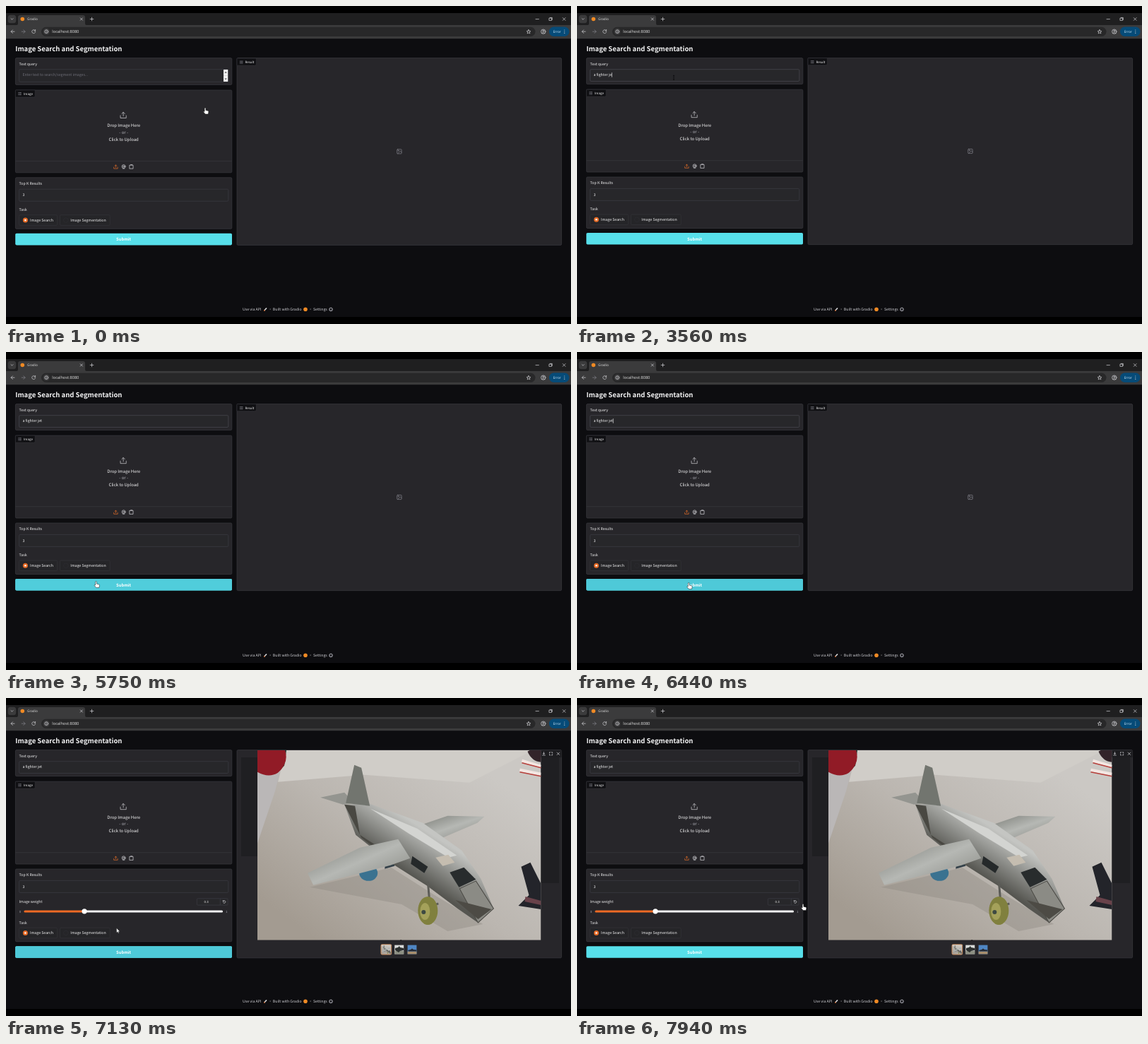
An HTML page for the animation above (8000 ms loop, 800 px wide and 450 px high).

```html
<!DOCTYPE html>
<html lang="en">
<head>
<meta charset="utf-8">
<title>Image Search and Segmentation</title>
<style>
html, body { margin: 0; width: 100%; height: 100%; overflow: hidden; background: #000; }
body > svg { display: block; width: 100vw; height: 100vh; }
text { font: 5.22px "Noto Sans CJK SC", "Noto Sans CJK JP", "Noto Sans", sans-serif; fill: #f4f4f5; text-rendering: geometricPrecision; }
.big { font-size: 5.97px; text-anchor: middle; }
.small { font-size: 4.47px; }
.mid { text-anchor: middle; }
.foot text { fill: #d0d0d5; }
.chrome text { font-family: "Open Sans", "Noto Sans", sans-serif; fill: #e3e3e3; }
.mono { font: bold 5px "Liberation Mono", monospace; text-anchor: end; }
.block { fill: #27262a; stroke: #3b3b41; stroke-width: .7; }
.field { fill: #27272a; stroke: #414148; stroke-width: .6; }
.badge { fill: #101013; stroke: #3b3b41; stroke-width: .5; }
.icon { fill: none; stroke: #d4d4d8; stroke-width: .7; stroke-linecap: round; stroke-linejoin: round; }
.dim { stroke: #85858d; }
.orange { stroke: #e8702a; }
.bar { fill: #19191b; }
.logo { fill: #f08a24; }
</style>
</head>
<body>
<svg viewBox="0 0 800 450">
  <defs>
    <linearGradient id="floor" gradientUnits="userSpaceOnUse" x1="640" y1="74" x2="440" y2="343">
      <stop stop-color="#cbc8c4"/><stop offset=".5" stop-color="#bbb6b0"/><stop offset="1" stop-color="#a39b91"/>
    </linearGradient>
    <linearGradient id="metal" gradientUnits="userSpaceOnUse" x1="590" y1="185" x2="555" y2="240">
      <stop stop-color="#c4c5c2"/><stop offset=".45" stop-color="#92938f"/><stop offset="1" stop-color="#555550"/>
    </linearGradient>
    <linearGradient id="wing" x2="1" y2="1">
      <stop stop-color="#777973"/><stop offset=".5" stop-color="#b6b8b4"/><stop offset="1" stop-color="#83847e"/>
    </linearGradient>
    <symbol id="photo" viewBox="356 74 401 269" preserveAspectRatio="xMidYMid slice">
      <path d="M356 74h401v269H356z" fill="url(#floor)"/>
      <path d="M356 74h40l-15 58-25 74z" fill="#bab7b7"/>
      <path d="M396 74h350l-90 46-150-11-121 10z" fill="#d0cdc8"/>
      <path d="M430 268l115-28 60 38 70 42-50 10-65-38z" fill="#8d8880" opacity=".4"/>
      <path d="M372 74h25l-3 22-8 8z" fill="#20382f"/>
      <path d="M356 74h39q6 18-10 32-13 8-29-1z" fill="#911b26"/>
      <path d="M738 76q8-5 19-2v17q-13-1-19-15z" fill="#32242a"/>
      <path d="M727 102l30 6M730 89l27 8" stroke="#f3e6e2" stroke-width="4"/>
      <path d="M727 105l30 6M730 92l27 7" stroke="#b9403c" stroke-width="1.5"/>
      <path d="M729 239l13-6 15 30v36l-32-5 15-15z" fill="#23242a"/>
      <path d="M735 281l22 6v6l-23-5z" fill="#69424a"/>
      <ellipse cx="513" cy="248" rx="13" ry="11" fill="#3a7290"/>
      <path d="M537 230l13 1v7l-14 4z" fill="#34414a"/>
      <path d="M445 141l34-7 14 15-16 2z" fill="#949590"/>
      <path d="M578 183l47-16 52 1-10 9-56 24z" fill="url(#wing)"/>
      <path d="M479 151l36-1 75 27 55 39 27 40 18 42-22 20-29-20-43-32-49-31-52-41z" fill="url(#metal)"/>
      <path d="M479 151l15 2 7 41 45 29-2 6-41-31z" fill="#494842"/>
      <path d="M493 95l10 4 12 54-34-4z" fill="#72756f"/>
      <path d="M516 157l66 28 56 38-12 3-56-34z" fill="#d3d4d1"/>
      <path d="M427 248l74-36 54-12 17 27-28 10-109 28z" fill="url(#wing)"/>
      <path d="M575 224l22 15-5 9-19-13z" fill="#25292a"/>
      <path d="M608 226l18-4 9 11-17 5z" fill="#c5bdb0"/>
      <path d="M628 247l20-7 17 17-24 11z" fill="#282c2d"/>
      <path d="M642 270l23-11 25 39-22 20z" fill="#8b8b85" stroke="#4a4944"/>
      <path d="M636 286l51 13-19 14z" fill="#4d4b45"/>
      <path d="M597 260l3 35 12-4" fill="none" stroke="#5c5c57" stroke-width="3"/>
      <ellipse cx="597" cy="301" rx="14" ry="20" fill="#80803e"/>
      <ellipse cx="593" cy="302" rx="7" ry="12" fill="#a4a15a"/>
      <circle cx="591" cy="303" r="3" fill="#3e4a42"/>
    </symbol>
  </defs>

  <path d="M0 10h800v430H0z" fill="#0d0d10"/>

  <g class="chrome">
    <path d="M0 10h800v17H0z" fill="#1f1f20"/>
    <path d="M0 27h800v19.2H0zM15 27q2 0 2-2V16q0-3 3-3h89q3 0 3 3v9q0 2 2 2z" fill="#3b3b3c"/>
    <rect x="2.7" y="12.7" width="11.5" height="11.5" rx="3.5" fill="#3b3b3c"/>
    <circle class="logo" cx="23.3" cy="18.5" r="2.8"/>
    <text x="30" y="20.4" font-size="4.7" style="font-size:4.7px">Gradio</text>
    <rect x="50" y="29.7" width="699.5" height="13.2" rx="6.6" fill="#282829"/>
    <circle cx="57.2" cy="36.2" r="4.6" fill="#3b3b3c"/>
    <text x="65.3" y="38.2" style="font-size:5.65px">localhost:8080</text>
    <rect x="769" y="29.5" width="28.5" height="13.5" rx="6.7" fill="#064b78"/>
    <text x="774.7" y="38" style="font-size:4.7px;fill:#d3ecff">Error</text>
    <path class="icon" d="M7 17.7l1.5 1.5 1.5-1.5M105.2 16.9l3.2 3.2m0-3.2l-3.2 3.2M119.2 18.5h4.6m-2.3-2.3v4.6M750 18.6h4.4M769.3 17.2h3.2v3.2h-3.2zM770.2 16.4h3.1v3.1M788.3 16.6l3.8 3.8m0-3.8l-3.8 3.8"/>
    <path class="icon" d="M12 36.2H7.2m2.2-2.3l-2.3 2.3 2.3 2.3M41.2 34.6a2.5 2.5 0 1 0 .5 2m-.1-3.1v1.7h-1.7M740 33.6l.8 1.8 2 .2-1.5 1.3.5 2-1.8-1.1-1.8 1.1.5-2-1.5-1.3 2-.2z"/>
    <path class="icon dim" d="M22.2 36.2H27m-2.2-2.3l2.3 2.3-2.3 2.3"/>
    <g class="icon">
      <circle cx="57.2" cy="36.2" r="2.4"/><path d="M57.2 36v1.3m0-2.5v.1"/>
      <circle cx="760.8" cy="36.2" r="3.2"/><circle cx="760.8" cy="35.3" r="1.1"/><path d="M758.7 38.4q2.1-1.8 4.2 0"/>
      <path stroke-width="1.1" d="M790.8 34v0m0 2.2v0m0 2.2v0"/>
    </g>
  </g>

  <text x="13.3" y="64.2" style="font-size:9.5px;font-weight:600">Image Search and Segmentation</text>

  <rect class="block" id="queryBlock" x="13.4" y="73.6" width="306.4" rx="1.5"/>
  <text x="18.6" y="84.2">Text query</text>
  <rect class="field" id="queryField" x="18.6" y="89.7" width="296.2" rx="1.5"/>
  <text id="query" x="23.4" y="99.3"></text>
  <path id="caret" d="M0 94.2v6.6" stroke="#fff" stroke-width=".6"/>
  <g id="spinner">
    <path d="M308 90h6.2v17H308z" fill="#f4f4f4"/>
    <path d="M309.3 95l1.8-2.5 1.8 2.5zM309.3 102.3l1.8 2.5 1.8-2.5z" fill="#777"/>
    <path d="M308 98.4h6.2" stroke="#bbb" stroke-width=".5"/>
  </g>

  <g id="page">
    <rect class="block" x="13.4" y="118.2" width="306.4" height="116.8" rx="1.5"/>
    <path class="badge" d="M13.4 118.2h27.8v8.2q0 1.8-1.8 1.8h-26z"/>
    <path class="icon dim" d="M17.6 121.7h.4m1 0h2.3m-3.7 1.6h.4m1 0h2.3m-3.7 1.6h.4m1 0h2.3"/>
    <text class="small" x="25" y="124.9">Image</text>
    <path class="icon" stroke-width=".9" d="M162 154.2v3.5h8.2v-3.5M166.1 155v-5.4m-2.2 2.1l2.2-2.2 2.2 2.2"/>
    <text class="big" x="166.7" y="170.5">Drop Image Here</text>
    <text class="big" x="166.7" y="180.4" style="fill:#b5b5bc">- or -</text>
    <text class="big" x="166.7" y="190.4">Click to Upload</text>
    <path d="M13.4 218.7h306.4" stroke="#3b3b41" stroke-width=".6"/>
    <path class="icon orange" d="M152.7 227.3v2h5.4v-2M155.4 227.6v-3.4m-1.4 1.3l1.4-1.4 1.4 1.4"/>
    <g class="icon"><circle cx="166.6" cy="226.3" r="2.5"/><circle cx="166.6" cy="226.3" r="1"/><path d="M165.3 229.2h2.6"/></g>
    <path class="icon" d="M175.2 224.4h4.8v5h-4.8zM176.5 223.8h2.2"/>

    <rect class="block" id="options" x="13.4" y="242" width="306.4" rx="1.5"/>
    <rect class="field" x="18.6" y="258.4" width="296.2" height="17" rx="1.5"/>
    <text x="23.4" y="268.5">3</text>
    <g id="waitLeft">
      <path d="M13.8 242.4h305.6v37.4H13.8z" fill="#27262a"/>
      <rect class="bar" x="13.4" y="242" height="37.8"/>
      <circle class="logo" cx="166.3" cy="260.4" r="3"/>
      <text class="mono" x="316.5" y="275.5"></text>
    </g>
    <text x="18.6" y="252.2">Top K Results</text>

    <g id="slider">
      <text x="18.6" y="290">Image weight</text>
      <rect class="field" x="270.3" y="283.8" width="43.8" height="9.3" rx="1.2"/>
      <path d="M303.3 283.8v9.3" stroke="#414148" stroke-width=".6"/>
      <text class="small mid" x="283.6" y="290.2">0.3</text>
      <path class="icon" d="M307.4 287.6a1.8 1.8 0 1 1 0 1.8m-.2-2.9v1.2h1.2"/>
      <g stroke-width="3.2" stroke-linecap="round"><path d="M110 302h195.5" stroke="#f1f1f2"/><path d="M27 302h83" stroke="#ee6a24"/></g>
      <circle cx="111" cy="301.8" r="3.6" fill="#fff"/>
      <text class="small mid" x="20" y="303.6" style="fill:#a1a1aa">0</text>
      <text class="small mid" x="312.2" y="303.6" style="fill:#a1a1aa">1</text>
    </g>

    <g id="lower">
      <text x="18.6" y="289.4">Task</text>
      <g fill="#252528" stroke="#37373c" stroke-width=".6">
        <rect x="18.6" y="295" width="54" height="14.6" rx="1.6"/><rect x="76.4" y="295" width="70.8" height="14.6" rx="1.6"/>
        <circle cx="84.8" cy="302.3" r="3.3" stroke="#303034"/>
      </g>
      <circle cx="27.4" cy="302.3" r="3.5" fill="#e66b26"/><circle cx="27.4" cy="302.3" r="1.3" fill="#fff"/>
      <text x="34" y="304.2">Image Search</text>
      <text x="91.2" y="304.2">Image Segmentation</text>
      <rect x="13.2" y="321" width="306.8" height="16.6" rx="1.8" fill="#57dfea"/>
      <rect id="hover" x="13.2" y="321" width="306.8" height="16.6" rx="1.8" fill="#4ec9d8"/>
      <text class="big" x="166.6" y="331.5" style="font-size:5.85px;font-weight:600;fill:#fff">Submit</text>
    </g>
  </g>

  <rect class="block" id="result" x="327" y="73.6" width="459.6" rx="1.5"/>
  <g id="empty">
    <path class="badge" d="M327 73.6h27.3v8.4q0 1.8-1.8 1.8H327z"/>
    <path class="icon dim" d="M331.3 77.6h.4m1 0h2.3m-3.7 1.6h.4m1 0h2.3m-3.7 1.6h.4m1 0h2.3"/>
    <text class="small" x="338.4" y="80.9">Result</text>
    <g class="icon dim"><rect x="553.7" y="202.4" width="6.4" height="6.2" rx=".8"/><circle cx="555.6" cy="204.3" r=".6"/><path d="M554.6 208.4l3.7-3.5 1.8 1.7"/></g>
  </g>
  <g id="waitRight">
    <rect class="bar" x="327" y="73.6" height="264"/>
    <circle class="logo" cx="556.3" cy="205" r="3"/>
    <text class="mono" x="783.5" y="333"></text>
  </g>
  <g id="gallery">
    <path d="M333 84h23v140h-23zM757 84h26v178h-26z" fill="#1f1f22"/>
    <use href="#photo" x="356" y="74" width="401.5" height="268.6"/>
    <path d="M757.5 74h29v10h-29z" fill="#1d1d20"/>
    <path class="icon" d="M761.5 76.6v3m-1.2-1.2l1.2 1.2 1.2-1.2M759.6 81h3.8M769.5 78v-1.2h1.2m1.8 0h1.2V78m0 1.7v1.2h-1.2m-1.8 0h-1.2v-1.2M780.1 77l3.6 3.6m0-3.6l-3.6 3.6"/>
    <path d="M557.8 343.2l1.3-1.2 1.3 1.2z" fill="#111"/>
    <use href="#photo" x="531" y="348.8" width="14.6" height="14.2"/>
    <rect x="531" y="348.8" width="14.6" height="14.2" rx="1.6" fill="none" stroke="#c78a5c"/>
    <path d="M550.2 349.6h13v12.8h-13z" fill="#d8dad9"/>
    <path d="M550.2 358h13v4.4h-13z" fill="#8d9083"/><path d="M551 354l4-1 2-2 1 2 5 1v3l-5 1-2 2-5-3z" fill="#2d3130"/>
    <path d="M568.6 349.6h12.8v12.8h-12.8z" fill="#4f86c3"/>
    <path d="M568.6 358.6h12.8v3.8h-12.8z" fill="#a88f6d"/><path d="M569 357l4-1 2-1.5 2 1.5 4 .5v2h-11z" fill="#252b35"/>
  </g>

  <g class="foot">
    <text x="335" y="431">Use via API</text>
    <path d="M365.2 430.6l2.8-3.3 1.3-.2-.2 1.4-2.8 2.8z" fill="#d5d5d8"/><path d="M365.2 429.5l1.8 1.9-1.9.4z" fill="#e66b26"/>
    <text class="mid" x="374" y="431">·</text>
    <text x="377.8" y="431">Built with Gradio</text>
    <circle class="logo" cx="424" cy="429.2" r="2.8"/>
    <text class="mid" x="431.2" y="431">·</text>
    <text x="435" y="431">Settings</text>
    <circle cx="460" cy="429.3" r="2" fill="none" stroke="#92929a" stroke-width="1.1"/>
    <circle cx="460" cy="429.3" r="2.6" fill="none" stroke="#92929a" stroke-width=".7" stroke-dasharray="1 1.04"/>
  </g>

  <g id="cursor">
    <path id="hand" d="M-.9.9a.9.9 0 0 1 1.8 0v2.7l3 .7q1.2.3 1 1.5l-.6 3.2H.2l-2.7-3.3q.2-1.2 1.6-.3z" fill="#fff" stroke="#111" stroke-width=".5"/>
    <path id="arrow" d="M0 0v6.6l1.5-1.4 1 2.3 1.1-.5-1-2.2h2.1z" fill="#fff" stroke="#111" stroke-width=".4"/>
    <path id="beam" d="M-1-3h2M0-3v6M-1 3h2" fill="none" stroke="#08080a" stroke-width=".7"/>
  </g>
</svg>
<script>
const LOOP = 8000, FOCUS = 880, CLICK = 6560, DONE = 7130;
const phrase = 'a fighter jet';
const keyTimes = [1060, 1750, 1880, 2060, 2310, 2380, 2500, 2690, 2750, 3000, 3380, 3560, 4060];
// time, x, y of the pointer tip
const route = [
  [60, 282, 144], [810, 137, 101.3], [4200, 137, 101.3], [4750, 140, 200],
  [5000, 140, 200], [5380, 125, 313], [5600, 125, 313], [5750, 127.5, 324.5],
  [6400, 158.2, 326.5], [7060, 158.2, 326.5], [7130, 156.5, 325.6],
  [7250, 156.5, 325.6], [7900, 320, 291.6]
];
const $ = id => document.getElementById(id);
const set = (id, name, value) => $(id).setAttribute(name, value);
const show = (id, on) => set(id, 'display', on ? 'inline' : 'none');
const clamp = v => Math.max(0, Math.min(1, v));

function pointerAt(t) {
  const next = route.findIndex(stop => stop[0] > t);
  if (next === 0) return route[0].slice(1);
  if (next < 0) return route.at(-1).slice(1);
  const [t0, x0, y0] = route[next - 1], [t1, x1, y1] = route[next];
  const u = (t - t0) / (t1 - t0), k = u * u * (3 - 2 * u);
  return [x0 + (x1 - x0) * k, y0 + (y1 - y0) * k];
}

function drawQuery(t) {
  const count = keyTimes.filter(k => k <= t).length;
  const query = $('query');
  query.textContent = (count ? phrase.slice(0, count) : 'Enter text to search/segment images...').replace(/ /g, '\u00a0');
  query.style.fill = count ? '#f4f4f5' : '#6f6f78';
  const sinceKey = t - (count ? keyTimes[count - 1] : FOCUS);
  const focused = t >= FOCUS && t < CLICK;
  const end = 23.7 + (count ? query.getComputedTextLength() : 0);
  set('caret', 'transform', `translate(${end})`);
  show('caret', focused && sinceKey % 1000 < 500);
  $('queryField').style.stroke = focused ? '#505058' : '';
  show('spinner', !count);
  return count ? 0 : 0.8;
}

function drawWait(t) {
  const part = clamp((t - CLICK - 63) / 800);
  const seconds = (Math.floor((t - CLICK) / 100) / 10).toFixed(1);
  for (const [id, width] of [['waitLeft', 306.4], ['waitRight', 459.6]]) {
    const on = t >= CLICK && t < DONE;
    show(id, on);
    if (!on) continue;
    $(id).querySelector('rect').setAttribute('width', width * part);
    $(id).querySelector('text').textContent = `processing | ${seconds}/0.8s`;
  }
}

function drawPointer(t) {
  const [x, y] = pointerAt(t);
  const inField = y > 89 && y < 107;
  const onButton = (y > 118 && y < 219) || (y > 321 && t < DONE) || x > 318;
  set('cursor', 'transform', `translate(${x} ${y})`);
  show('beam', inField);
  show('hand', !inField && onButton);
  show('arrow', !inField && !onButton);
}

function draw(t) {
  const extra = drawQuery(t), done = t >= DONE, grow = done ? 30.2 : 0;
  set('queryBlock', 'height', 37 + extra);
  set('queryField', 'height', 16.8 + extra);
  set('page', 'transform', `translate(0 ${extra})`);
  set('empty', 'transform', `translate(0 ${extra / 2})`);
  set('options', 'height', 72.5 + grow);
  set('lower', 'transform', `translate(0 ${grow})`);
  set('result', 'height', 264 + extra + grow);
  set('hover', 'opacity', clamp((t - 5630) / 150) * (1 - clamp((t - DONE - 60) / 150)));
  show('slider', done);
  show('gallery', done);
  show('empty', t < CLICK);
  drawWait(t);
  drawPointer(t);
}

const start = performance.now();
function tick() {
  draw((performance.now() - start) % LOOP);
  requestAnimationFrame(tick);
}
tick();
</script>
</body>
</html>
```
